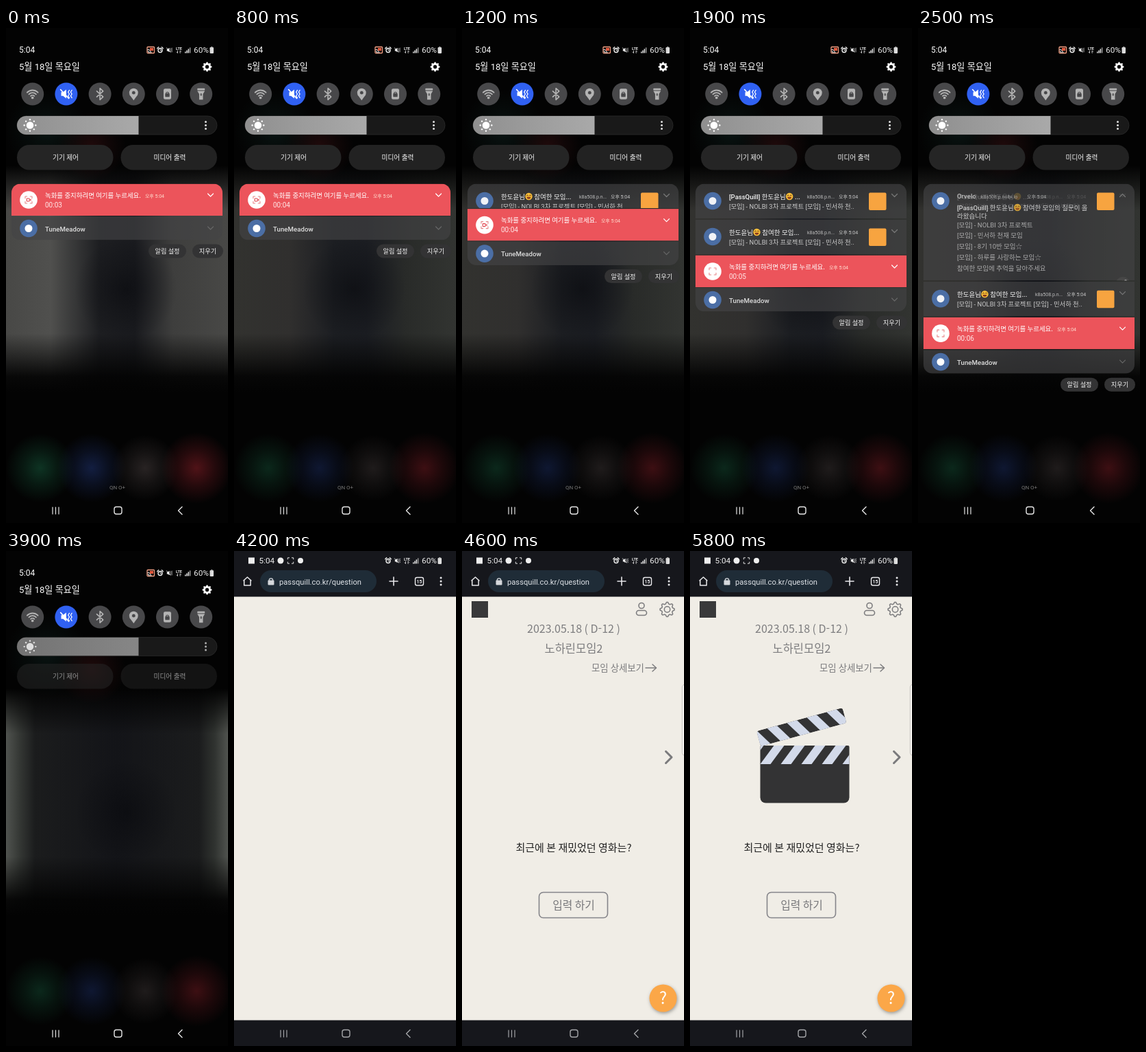
An HTML page with a canvas for the animation above (5.9 s loop, 324 by 720 pixels).

```html
<!DOCTYPE html>
<html lang="ko">
<head>
<meta charset="utf-8">
<title>Notification demo</title>
<style>
html, body { margin: 0; width: 100%; height: 100%; overflow: hidden; background: #000; }
canvas { display: block; width: 324px; height: 720px; }
</style>
</head>
<body>
<canvas id="stage"></canvas>
<script>
const W = 324, H = 720, LOOP = 5900, STEP = 100;
const canvas = document.getElementById('stage');
const ctx = canvas.getContext('2d');
const dpr = window.devicePixelRatio || 1;
canvas.width = W * dpr;
canvas.height = H * dpr;

const UI = "Roboto, 'Noto Sans CJK KR', 'Noto Sans CJK', sans-serif";
const PAGE = "'Noto Sans CJK KR', 'Noto Sans CJK', sans-serif";
const ORANGE = '#f7a440', BLUE = '#4b6ea5';

const ramp = (t, a, b) => Math.min(1, Math.max(0, (t - a) / (b - a)));
const ease = (t, a, b) => { const p = ramp(t, a, b); return 1 - (1 - p) ** 3; };

function text(s, x, y, size, color = '#fff', weight = 400, align = 'left', font = UI) {
  ctx.font = `${weight} ${size}px ${font}`;
  ctx.textAlign = align;
  ctx.fillStyle = color;
  ctx.fillText(s, x, y);
  return ctx.measureText(s).width;
}
function box(x, y, w, h, r, fill) {
  ctx.beginPath();
  ctx.roundRect(x, y, w, h, r);
  ctx.fillStyle = fill;
  ctx.fill();
}
function frame(x, y, w, h, r, color, lw) {
  ctx.beginPath();
  ctx.roundRect(x, y, w, h, r);
  ctx.strokeStyle = color;
  ctx.lineWidth = lw;
  ctx.stroke();
}
function disc(x, y, r, fill) {
  ctx.beginPath();
  ctx.arc(x, y, r, 0, 7);
  ctx.fillStyle = fill;
  ctx.fill();
}
function arc(x, y, r, a, b, color, lw) {
  ctx.beginPath();
  ctx.arc(x, y, r, a, b);
  ctx.strokeStyle = color;
  ctx.lineWidth = lw;
  ctx.stroke();
}
function line(pts, color, lw) {
  ctx.beginPath();
  pts.forEach(p => ctx.lineTo(p[0], p[1]));
  ctx.strokeStyle = color;
  ctx.lineWidth = lw;
  ctx.stroke();
}
function poly(pts, color) {
  ctx.beginPath();
  pts.forEach(p => ctx.lineTo(p[0], p[1]));
  ctx.fillStyle = color;
  ctx.fill();
}
function layer(alpha, draw) {
  if (alpha <= 0) return;
  ctx.save();
  ctx.globalAlpha *= alpha;
  draw();
  ctx.restore();
}
function at(x, y, draw, scale = 1) {
  ctx.save();
  ctx.translate(x, y);
  ctx.scale(scale, scale);
  draw();
  ctx.restore();
}

// ---- icons, drawn around the origin ----
function speaker(c) {
  poly([[-7, -3], [-4, -3], [1, -7], [1, 7], [-4, 3], [-7, 3]], c);
}
function gear(r, teeth, color, hole) {
  ctx.beginPath();
  for (let i = 0; i < teeth * 4; i++) {
    const a = (i - .5) * Math.PI / teeth / 2, q = i % 4 < 2 ? r : r * .78;
    ctx.lineTo(Math.cos(a) * q, Math.sin(a) * q);
  }
  ctx.closePath();
  if (hole) { ctx.fillStyle = color; ctx.fill(); disc(0, 0, r * .38, hole); }
  else { ctx.strokeStyle = color; ctx.lineWidth = 1.5; ctx.stroke(); arc(0, 0, r * .4, 0, 7, color, 1.5); }
}
function corners(s, color, lw) {
  const k = s * .45;
  for (const [a, b] of [[-1, -1], [1, -1], [1, 1], [-1, 1]])
    line([[a * s, b * k], [a * s, b * s], [a * k, b * s]], color, lw);
}
function chevron(x, y, up, color) {
  const d = up ? -2 : 2;
  line([[x - 4, y - d], [x, y + d], [x + 4, y - d]], color, 1.2);
}
const tiles = [
  c => {
    for (const r of [4, 8, 12]) arc(0, 6, r, -2.36, -.78, c, 2);
    disc(0, 6, 2, c);
  },
  c => {
    at(-1, 0, () => speaker(c));
    line([[-9, -7], [4, 7]], c, 1.8);
    for (const x of [5, 9]) line([[x, -6], [x - 2, -3], [x, 0], [x - 2, 3], [x, 6]], c, 1.4);
  },
  c => line([[-5, -4.5], [5, 4.5], [0, 9], [0, -9], [5, -4.5], [-5, 4.5]], c, 1.8),
  c => {
    poly([[-6.5, 1], [6.5, 1], [0, 10]], c);
    disc(0, -2, 7, c);
    disc(0, -2, 2.6, '#48484a');
  },
  c => {
    box(-6, -8.5, 12, 17, 2.5, c);
    box(-3.5, -1, 7, 5.5, 1, '#48484a');
    arc(0, -1, 2, Math.PI, 0, '#48484a', 1.3);
  },
  c => {
    box(-6, -9, 12, 3, 1, c);
    poly([[-6, -5], [6, -5], [3, 0], [3, 9], [-3, 9], [-3, 0]], c);
    box(-1, -1, 2, 4, 1, '#48484a');
  }
];

function statusRight(y) {
  const c = '#eee';
  at(225, y, () => {
    arc(0, .5, 3, 0, 7, c, 1.4);
    line([[0, -1.5], [0, .8], [1.6, .8]], c, .9);
    line([[-4.3, -2.3], [-2.3, -4.3]], c, 1.3);
    line([[4.3, -2.3], [2.3, -4.3]], c, 1.3);
  });
  at(238.5, y, () => tiles[1](c), .46);
  text('LTE', 252.5, y - .5, 5.5, c, 700, 'center');
  line([[250.5, y + 1], [250.5, y + 4.5], [249, y + 3]], c, .8);
  line([[254, y + 4.5], [254, y + 1], [255.5, y + 2.5]], c, .8);
  for (let i = 0; i < 4; i++)
    box(261 + i * 2.3, y + 2.4 - i * 2, 1.5, 2 + i * 2, 0, i < 3 ? c : '#999');
  text('60%', 274, y + 4, 11.8, '#eee');
  box(297.5, y - 4, 5.5, 9, 1.3, '#ddd');
  box(299, y - 5, 2.5, 1.5, 0, '#999');
}
function navBar(c) {
  for (const x of [68, 72.5, 77]) line([[x, 697], [x, 707]], c, 1.2);
  frame(158, 696.5, 11, 10.5, 3, c, 1.4);
  line([[257, 696.5], [251.5, 702], [257, 707.5]], c, 1.4);
}

// ---- blurred backdrop ----
function band(stops) {
  const g = ctx.createLinearGradient(0, 0, W, 0);
  stops.forEach(([p, c]) => g.addColorStop(p, c));
  ctx.fillStyle = g;
  ctx.fillRect(0, 200, W, 330);
}
function glow(x, y, r, rgb, a) {
  const g = ctx.createRadialGradient(x, y, 0, x, y, r);
  g.addColorStop(0, `rgba(${rgb},${a})`);
  g.addColorStop(.5, `rgba(${rgb},${a * .45})`);
  g.addColorStop(1, `rgba(${rgb},0)`);
  ctx.fillStyle = g;
  ctx.fillRect(x - r, y - r, r * 2, r * 2);
}
function backdrop(t) {
  ctx.fillStyle = '#030303';
  ctx.fillRect(0, 0, W, H);
  band([[0, '#32322f'], [.25, '#302f2e'], [.45, '#1c1e22'], [.6, '#1b1d22'], [.78, '#292b29'], [1, '#323431']]);
  layer(1 - ease(t, 0, 600), () =>
    band([[0, '#484846'], [.2, '#50504e'], [.42, '#1d1e21'], [.58, '#1a1b1f'], [.75, '#3e3e3d'], [1, '#484846']]));
  layer(ramp(t, 3500, 3900), () =>
    band([[0, '#50534f'], [.06, '#353835'], [.13, '#1b1c1d'], [.5, '#131418'], [.87, '#1b1c1d'], [.94, '#303330'], [1, '#50534f']]));
  glow(175, 380, 75, '8,9,13', .6);
  const g = ctx.createLinearGradient(0, 200, 0, 530);
  g.addColorStop(0, '#030303');
  g.addColorStop(.2, 'rgba(3,3,3,0)');
  g.addColorStop(.74, 'rgba(3,3,3,0)');
  g.addColorStop(.93, 'rgba(3,3,3,.93)');
  g.addColorStop(1, '#030303');
  ctx.fillStyle = g;
  ctx.fillRect(0, 199, W, 332);
  const k = .62 + .2 * (1 - ease(t, 0, 600));
  glow(50, 640, 50, '16,62,42', k);
  glow(125, 640, 50, '22,36,78', k);
  glow(203, 640, 48, '48,42,42', k);
  glow(278, 640, 52, '96,22,28', k);
  glow(60, 150, 60, '20,50,45', .35);
  glow(125, 172, 50, '85,25,28', .35);
}

// ---- quick panel ----
function panel(close) {
  const dim = 1 - .4 * close;
  text('5:04', 19, 36, 12);
  at(211, 32, () => {
    frame(-5, -4.5, 10.5, 9, 1, '#f3a084', 1.3);
    for (const r of [2, 4.5]) arc(-4, 4, r, -1.57, 0, '#fff', 1.2);
    box(-1, -3, 5, 4, 0, '#e2573c');
  });
  statusRight(32);
  text('5월 18일 목요일', 19, 61, 13.1);
  at(293.5, 56.5, () => gear(7, 8, '#fff', '#0a0a0a'));

  tiles.forEach((icon, i) => {
    const x = 38.7 + i * 49.2, on = i === 1;
    disc(x, 96, 16.5, on ? '#3061f2' : '#48484a');
    at(x, 96, () => icon(on ? '#fff' : '#b4b4b4'), .92);
  });

  ctx.save();
  ctx.translate(0, -4 * close);
  ctx.beginPath();
  ctx.roundRect(16, 128, 292, 27, 13.5);
  ctx.fillStyle = '#191919';
  ctx.fill();
  ctx.strokeStyle = '#2b2b2b';
  ctx.lineWidth = .8;
  ctx.stroke();
  ctx.clip();
  ctx.globalAlpha *= dim;
  const g = ctx.createLinearGradient(16, 0, 193, 0);
  g.addColorStop(0, '#8f8f8f');
  g.addColorStop(1, '#a9a9a9');
  ctx.fillStyle = g;
  ctx.fillRect(16, 128, 177.5, 27);
  disc(35, 141.5, 5.3, '#fff');
  for (let i = 0; i < 8; i++) {
    const a = i * Math.PI / 4;
    disc(35 + Math.cos(a) * 8.3, 141.5 + Math.sin(a) * 8.3, 1.2, '#fff');
  }
  for (const d of [-5, 0, 5]) disc(291.5, 141.5 + d, 1.5, '#ddd');
  ctx.restore();

  layer(1 - .75 * close, () => {
    ctx.translate(0, -10 * close);
    box(16, 170, 140.5, 36.5, 18, '#252525');
    box(167.5, 170, 140.5, 36.5, 18, '#222222');
    text('기기 제어', 87, 191.5, 9.7, '#f4f4f4', 500, 'center');
    text('미디어 출력', 239, 191.5, 9.7, '#f4f4f4', 500, 'center');
  });
}

// ---- notifications ----
function smile(x, y) {
  disc(x, y, 5.2, '#f9bf3a');
  arc(x - 2, y - 1, 1, 3.14, 6.28, '#5a3410', .9);
  arc(x + 2, y - 1, 1, 3.14, 6.28, '#5a3410', .9);
  ctx.beginPath();
  ctx.arc(x, y + .8, 2.9, 0, Math.PI);
  ctx.fillStyle = '#8a3a1c';
  ctx.fill();
}
function headline(a, b, y) {
  const x = 57 + text(a, 57, y, 9.5, '#f4f4f4', 500);
  smile(x + 5.5, y - 3.5);
  text(b, x + 11, y, 9.5, '#f4f4f4', 500);
}
function card(y, h, fill, draw) {
  if (h < 1) return;
  ctx.save();
  ctx.beginPath();
  ctx.rect(8, y, 308, h);
  ctx.clip();
  ctx.fillStyle = fill;
  ctx.fillRect(8, y, 308, h);
  ctx.translate(0, y);
  draw();
  ctx.restore();
}
const GREY = 'rgba(68,68,69,.64)';
const SITE = 'k8a508.p.nolbi.io';

function appIcons() {
  disc(33, 25, 12.8, BLUE);
  disc(33, 25, 5.5, '#f1f3f7');
  box(261, 13, 25.5, 25.5, 2, ORANGE);
}
function brief(a, b) {
  headline(a, b, 22);
  text('k8a508.p.n...', 171, 21.5, 7, '#bbb');
  text('오후 5:04', 217, 21.5, 7, '#ccc');
  text('[모임] - NOLBI 3차 프로젝트 [모임] - 민서하 천..', 57, 36, 9.4, '#c9c9c9');
  chevron(298.5, 17, false, '#777');
}
function detail() {
  const w = text('Orvelo', 57, 21, 9.6, '#ddd', 500);
  text(SITE, 57 + w + 7, 21, 7, '#bbb');
  text('오후 5:04', 159, 21, 7, '#ccc');
  headline('[PassQuill] 한도윤님', ' 참여한 모임의 질문이 올', 38);
  text('라왔습니다', 57, 50, 9.5, '#f4f4f4', 500);
  [['[모임] - NOLBI 3차 프로젝트', 63.5], ['[모임] - 민서하 천재 모임', 78], ['[모임] - 8기 10반 모임☆', 94],
   ['[모임] - 하루를 사랑하는 모임☆', 110.5], ['참여한 모임에 추억을 달아주세요', 126]]
    .forEach(([s, y]) => text(s, 57, y, 9.5, '#c9c9c9'));
  text('사이트 설정', 147.5, 148.5, 8.5, '#f4f4f4', 500, 'center');
  chevron(298.5, 17, true, '#888');
  disc(299, 146, 10.5, '#4a4a4b');
  at(299, 146, () => {
    poly([[-5, 3.5], [-3.5, 1], [-3, -3], [0, -5], [3, -3], [3.5, 1], [5, 3.5]], '#eee');
    disc(0, 4.6, 1.5, '#eee');
    disc(4, -4, 2.2, '#eee');
  });
}
function list(t) {
  const first = ease(t, 1100, 1400), second = ease(t, 1300, 1700), open = ease(t, 2300, 2800);
  const sec = 3 + Math.floor(ramp(t, -500, 2500) * 3);
  const h1 = 50.5 * second + 115 * open, h2 = 50.5 * first;
  const y2 = 226.5 + h1 + 1.5 * second;
  const red = y2 + h2 + 1.5 * first, last = red + 47.5, end = last + 34.5;

  ctx.save();
  ctx.beginPath();
  ctx.roundRect(8, 226.5, 308, end - 226.5, 13);
  ctx.clip();
  card(226.5, h1, GREY, () => {
    layer(1 - open, () => brief('[PassQuill] 한도윤님', ' ...'));
    layer(open, detail);
    appIcons();
  });
  card(y2, h2, GREY, () => {
    brief('한도윤님', ' 참여한 모임...');
    appIcons();
  });
  card(red, 46.5, '#ec545b', () => {
    disc(33, 23.5, 12.8, '#fff');
    at(33, 23.5, () => {
      corners(5, '#e8878a', 1.1);
      if (t < 1300) {
        frame(-2.8, -2, 4, 4, .8, '#e0454d', 1.1);
        poly([[1.6, 0], [3.6, -1.7], [3.6, 1.7]], '#e0454d');
      }
    });
    const w = text('녹화를 중지하려면 여기를 누르세요.', 57, 20, 9.45, '#fff', 500);
    text('오후 5:04', 57 + w + 6, 20, 7, '#ffe0d2');
    text('00:0' + sec, 57, 34, 10, '#ffe9e9');
    chevron(298.5, 16.5, false, '#fff');
  });
  card(last, 34.5, GREY, () => {
    disc(33, 17.5, 12.8, BLUE);
    disc(33, 17.5, 5.5, '#fff');
    text('TuneMeadow', 57, 21.5, 9.7, '#ddd', 500);
    chevron(298.5, 17, false, '#666');
  });
  ctx.restore();

  box(208, end + 6, 55, 20, 10, '#333334');
  box(272, end + 6, 45, 20, 10, '#333334');
  text('알림 설정', 235.5, end + 19.5, 9.2, '#f2f2f2', 500, 'center');
  text('지우기', 294.5, end + 19.5, 9.2, '#f2f2f2', 500, 'center');
}

function shade(t) {
  const close = ramp(t, 3600, 4100);
  backdrop(t);
  panel(close);
  layer(1 - ramp(t, 3550, 3850), () => {
    list(t);
    text('QN O+', 162.5, 670.5, 8, '#777', 400, 'center');
  });
  navBar('#e6e6e6');
}

// ---- browser ----
function browser() {
  ctx.fillStyle = '#16171c';
  ctx.fillRect(0, 0, W, H);
  box(21, 9.5, 9, 9, 0, '#eee');
  text('5:04', 36.5, 18, 11.8, '#eee');
  disc(68, 14, 4.5, '#eee');
  at(82.5, 14, () => corners(4.2, '#ddd', 1));
  disc(97, 14, 4, '#eee');
  statusRight(14);

  const c = '#e8e8ea';
  line([[14, 43], [19.5, 38], [25, 43]], c, 1.5);
  line([[14.8, 42.5], [14.8, 50], [24.2, 50], [24.2, 42.5]], c, 1.5);
  box(38, 28, 170, 32, 16, '#1f2c37');
  box(49.5, 42.5, 9, 7, 1, '#d5d8dc');
  arc(54, 42.5, 2.7, Math.PI, 0, '#d5d8dc', 1.3);
  text('passquill.co.kr/question', 66, 48.5, 11.2, '#dfe3e8');
  line([[227, 44], [239, 44]], c, 1.6);
  line([[233, 38], [233, 50]], c, 1.6);
  frame(264.5, 38.5, 12, 11.5, 2.5, c, 1.4);
  text('15', 270.5, 47, 6.8, c, 700, 'center');
  for (const d of [-5, 0, 5]) disc(302, 44 + d, 1.5, c);

  ctx.fillStyle = '#f0ede6';
  ctx.fillRect(0, 66.5, W, 616);
  navBar('#a4a5a8');
}
function stripes(w, h, lean) {
  for (let x = -30; x < w + 30; x += 30)
    poly([[x + lean, 0], [x + lean + 15, 0], [x + 15, h], [x, h]], '#d3daea');
}
function clapper() {
  ctx.save();
  ctx.beginPath();
  ctx.roundRect(102.5, 283, 130, 83.5, [2, 2, 8, 8]);
  ctx.clip();
  ctx.fillStyle = '#333334';
  ctx.fillRect(100, 280, 140, 90);
  ctx.translate(102.5, 283);
  stripes(130, 27, 20);
  ctx.restore();
  ctx.save();
  ctx.translate(97, 262);
  ctx.rotate(-.265);
  ctx.beginPath();
  ctx.roundRect(0, 0, 130, 23, 4);
  ctx.clip();
  ctx.fillStyle = '#333334';
  ctx.fillRect(0, 0, 130, 23);
  stripes(130, 23, -14);
  ctx.restore();
}
function page(t) {
  const c = '#7c7c7e';
  const label = (s, y, size, color = c, weight = 300) => text(s, 163, y, size, color, weight, 'center', PAGE);
  box(14, 73, 24, 24, 0, '#39393a');
  arc(262, 79.5, 4, 0, 7, c, 1.6);
  frame(254.5, 86.5, 15, 7, 3.5, c, 1.6);
  at(299.5, 85, () => gear(10.5, 8, c));

  label('2023.05.18 ( D-12 )', 119, 16);
  label('노하린모임2', 148, 16.5);
  text('모임 상세보기', 189, 175, 13.4, c, 300, 'left', PAGE);
  line([[268, 170], [283, 170]], c, 1.5);
  line([[278, 165], [283.5, 170], [278, 175]], c, 1.5);

  box(321, 194, 12, 104, 4, '#f8f6f2');
  frame(321.3, 194, 12, 103.5, 4, '#c4c1bc', 1);
  line([[297.5, 291.5], [306, 300], [297.5, 308.5]], '#7a7a7c', 3);

  layer(ramp(t, 4700, 5000), clapper);
  label('최근에 본 재밌었던 영화는?', 437, 15, '#222', 500);
  frame(112.5, 496.5, 100, 37, 6, '#85858a', 1.6);
  label('입력 하기', 520.5, 15.8, '#77777a', 400);

  ctx.save();
  ctx.shadowColor = 'rgba(0,0,0,.35)';
  ctx.shadowBlur = 5 * dpr;
  ctx.shadowOffsetX = dpr;
  ctx.shadowOffsetY = 2 * dpr;
  disc(293.5, 650.5, 20, '#fba748');
  ctx.restore();
  text('?', 293.5, 658.5, 24, '#fff', 500, 'center', PAGE);
}

function draw(t) {
  ctx.setTransform(dpr, 0, 0, dpr, 0, 0);
  ctx.lineCap = ctx.lineJoin = 'round';
  const app = ramp(t, 3950, 4200);
  if (app < 1) shade(t);
  layer(app, browser);
  layer(ramp(t, 4200, 4400), () => page(t));
}

const start = performance.now();
function tick() {
  const t = (performance.now() - start) % LOOP;
  draw(Math.floor(t / STEP) * STEP);
  requestAnimationFrame(tick);
}
tick();
</script>
</body>
</html>
```
